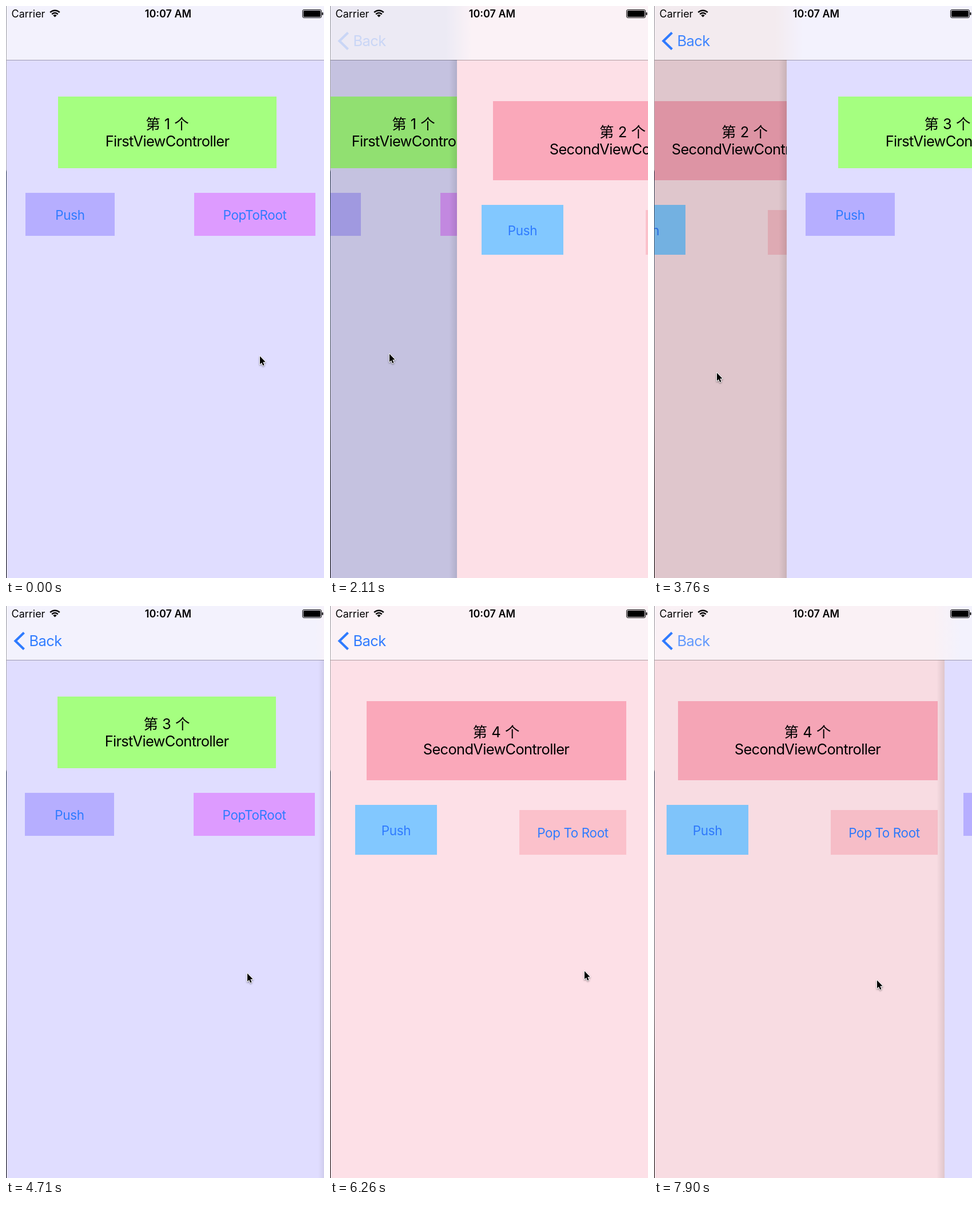
An HTML page with a canvas for the animation above (8000 ms loop, 556 by 998 pixels).

```html
<!DOCTYPE html>
<html lang="zh">
<head>
<meta charset="utf-8">
<title>Edge swipe push</title>
<style>
html, body { margin: 0; width: 100%; height: 100%; overflow: hidden; background: #e0ddff; }
canvas { display: block; width: 556px; height: 998px; }
</style>
</head>
<body>
<canvas id="stage" width="556" height="998"></canvas>
<script>
const ctx = document.getElementById('stage').getContext('2d');
const W = 556, H = 998, LOOP = 8000;
const PAGE = 562;      // real screen width, slightly wider than the stage
const BAR = 94;
const BLUE = '#2f7bff';
const FONT = 'Inter, "Noto Sans CJK SC", "Noto Sans CJK", "Noto Sans", sans-serif';

const first = {
  bg: '#e0ddff',
  title: 'FirstViewController',
  label: { box: [91, 158, 382, 125], fill: '#a5ff80', cx: 282, y: 214.5 },
  buttons: [
    { box: [34, 326, 156, 75], fill: '#b6aeff', text: 'Push' },
    { box: [329, 326, 212, 75], fill: '#dd9bff', text: 'PopToRoot' }
  ]
};
const second = {
  bg: '#fde0e7',
  title: 'SecondViewController',
  label: { box: [64, 166, 454, 138], fill: '#faa8ba', cx: 290.5, y: 229 },
  buttons: [
    { box: [44, 347, 143, 87], fill: '#82c8ff', text: 'Push' },
    { box: [331, 356, 187, 78], fill: '#fbc1cb', text: 'Pop To Root' }
  ]
};
const pageKind = n => n % 2 ? first : second;

// Pointer path: time, x, y
const pointer = [
  [0, 444, 611], [90, 444, 611], [530, 467, 597], [760, 467, 597],
  [840, 445, 600], [2110, 104, 607], [2220, 92, 607], [2400, 96, 608],
  [2900, 450, 618], [3010, 448, 620], [3100, 426, 622], [3260, 341, 627],
  [3750, 110, 640], [3950, 115, 640], [4260, 431, 643], [4540, 485, 655],
  [4660, 485, 655], [4710, 423, 641], [5250, 150, 649], [5620, 150, 649],
  [6100, 455, 640], [6200, 455, 638], [6290, 440, 636], [6710, 128, 626],
  [6850, 100, 626], [7090, 100, 626], [7780, 382, 651], [7900, 390, 653],
  [8000, 396, 654]
];

// Each swipe: page left behind, drag keys (time, left of new page), end of the settle
const swipes = [
  { from: 1, drag: [[840, 562], [2110, 221], [2220, 209]], end: 2560 },
  { from: 2, drag: [[3100, 562], [3260, 477], [3750, 246]], end: 4100 },
  { from: 3, drag: [[4680, 562], [4710, 560], [5250, 286], [5400, 286]], end: 5735 },
  { from: 4, drag: [[6290, 562], [6710, 250], [6850, 222], [7090, 222], [7780, 499], [7900, 507], [8000, 513]], end: 9000 }
];

const clamp = v => Math.max(0, Math.min(1, v));

function along(keys, t, col) {
  let i = 1;
  while (i < keys.length - 1 && keys[i][0] < t) i++;
  const a = keys[i - 1], b = keys[i];
  return a[col] + (b[col] - a[col]) * clamp((t - a[0]) / (b[0] - a[0]));
}

function stateAt(t) {
  let page = 1;
  for (const s of swipes) {
    if (t < s.drag[0][0]) break;
    if (t >= s.end) { page = s.from + 1; continue; }
    const [release, x] = s.drag[s.drag.length - 1];
    const left = t <= release
      ? along(s.drag, t, 1)
      : x * (1 - (t - release) / (s.end - release)) ** 2;
    return { page: s.from, left, p: 1 - left / PAGE };
  }
  return { page, left: PAGE, p: 0 };
}

function rect(box, fill) {
  ctx.fillStyle = fill;
  ctx.fillRect(...box);
}

function text(str, x, y, size, { color = '#000', align = 'center', weight = 400, track = 0 } = {}) {
  ctx.font = `${weight} ${size}px ${FONT}`;
  ctx.letterSpacing = track + 'px';
  ctx.textAlign = align;
  ctx.fillStyle = color;
  ctx.fillText(str, x, y);
}

function drawPage(n, x) {
  const { bg, title, label, buttons } = pageKind(n);
  ctx.save();
  ctx.translate(Math.round(x), 0);
  rect([1, 0, PAGE + 2, H], bg);
  rect(label.box, label.fill);
  text(`第 ${n} 个`, label.cx, label.y, 25.5);
  text(title, label.cx, label.y + 30, 25.5, { track: -0.7 });
  for (const { box: [bx, by, bw, bh], fill, text: caption } of buttons) {
    rect([bx, by, bw, bh], fill);
    text(caption, bx + bw / 2, by + bh / 2 + 9, 22.5, { color: BLUE, track: -0.4 });
  }
  ctx.restore();
}

function drawPages({ page, left, p }) {
  drawPage(page, -0.4 * PAGE * p);
  if (!p) return;
  rect([0, 0, W, H], `rgba(0,0,0,${0.2 * p})`);
  const edge = Math.round(left) + 1;
  const shade = ctx.createLinearGradient(edge - 14, 0, edge, 0);
  shade.addColorStop(0, 'rgba(0,0,0,0)');
  shade.addColorStop(1, 'rgba(0,0,0,0.1)');
  rect([edge - 14, BAR, 14, H - BAR], shade);
  drawPage(page + 1, left);
}

function backAlpha(page, p) {
  if (page === 1) return clamp((p - 0.5) * 2) ** 1.1;
  return p < 0.25 ? 1 - 2.6 * p : clamp(0.35 + (p - 0.25) * 1.7);
}

function drawBar({ page, left, p }) {
  rect([0, 0, W, BAR], pageKind(page).bg);
  if (p) {
    rect([0, 0, W, BAR], `rgba(0,0,0,${0.2 * p})`);
    const next = pageKind(page + 1).bg;
    const blend = ctx.createLinearGradient(left - 18, 0, left + 28, 0);
    blend.addColorStop(0, next + '00');
    blend.addColorStop(1, next);
    rect([0, 0, W, BAR], blend);
  }
  rect([0, 0, W, BAR], 'rgba(251,250,252,0.73)');
  rect([0, BAR, W, 1], 'rgba(0,0,0,0.3)');

  const alpha = backAlpha(page, p);
  ctx.globalAlpha = page === 1 ? alpha : 1;
  ctx.strokeStyle = BLUE;
  ctx.lineWidth = 4.2;
  ctx.beginPath();
  ctx.moveTo(31.5, 46.5);
  ctx.lineTo(16.5, 61);
  ctx.lineTo(31.5, 75.5);
  ctx.stroke();
  ctx.globalAlpha = alpha;
  text('Back', 40.5, 70, 25.5, { color: BLUE, align: 'left', track: -0.6 });
  ctx.globalAlpha = 1;
}

function drawStatus() {
  text('Carrier', 9.5, 20, 18, { align: 'left' });
  text('10:07 AM', 283.5, 20, 18, { weight: 600 });

  ctx.strokeStyle = ctx.fillStyle = '#000';
  const fan = Math.PI / 4, up = -Math.PI / 2;
  ctx.lineWidth = 2.5;
  for (const r of [7.4, 11.7]) {
    ctx.beginPath();
    ctx.arc(85.5, 19.5, r, up - fan, up + fan);
    ctx.stroke();
  }
  ctx.beginPath();
  ctx.moveTo(85.5, 19.5);
  ctx.arc(85.5, 19.5, 4.4, up - fan, up + fan);
  ctx.fill();

  ctx.lineWidth = 1;
  ctx.beginPath();
  ctx.roundRect(518.5, 6.5, 33, 14, 2.5);
  ctx.stroke();
  ctx.beginPath();
  ctx.roundRect(520, 8, 30, 11, 1.5);
  ctx.roundRect(552.5, 11, 2, 5, 1);
  ctx.fill();
}

// Sliver of desktop showing left of the screen
function drawSliver() {
  const g = ctx.createLinearGradient(0, 0, 0, H);
  [[0, '#8d9096'], [0.09, '#a9a9ac'], [0.286, '#b0b0b0'], [0.29, '#2c3a4c'], [0.4, '#56657a'],
   [0.55, '#5c6a70'], [0.7, '#55585a'], [0.85, '#15171a'], [1, '#000']]
    .forEach(stop => g.addColorStop(...stop));
  rect([0, 0, 1, H], g);
}

const arrow = new Path2D('M0 0V14L3.1 11.2L5.3 16.2L7.5 15.2L5.3 10.3L9.6 10Z');

function drawPointer(t) {
  ctx.save();
  ctx.translate(Math.round(along(pointer, t, 1)), Math.round(along(pointer, t, 2)));
  ctx.shadowColor = 'rgba(0,0,0,0.4)';
  ctx.shadowBlur = 3;
  ctx.shadowOffsetY = 1.5;
  ctx.strokeStyle = '#fff';
  ctx.lineWidth = 2;
  ctx.lineJoin = 'round';
  ctx.stroke(arrow);
  ctx.shadowColor = 'transparent';
  ctx.fillStyle = '#000';
  ctx.fill(arrow);
  ctx.restore();
}

const start = performance.now();

function frame() {
  const t = (performance.now() - start) % LOOP;
  const state = stateAt(t);
  drawPages(state);
  drawBar(state);
  drawStatus();
  drawSliver();
  drawPointer(t);
  requestAnimationFrame(frame);
}
frame();
</script>
</body>
</html>
```
